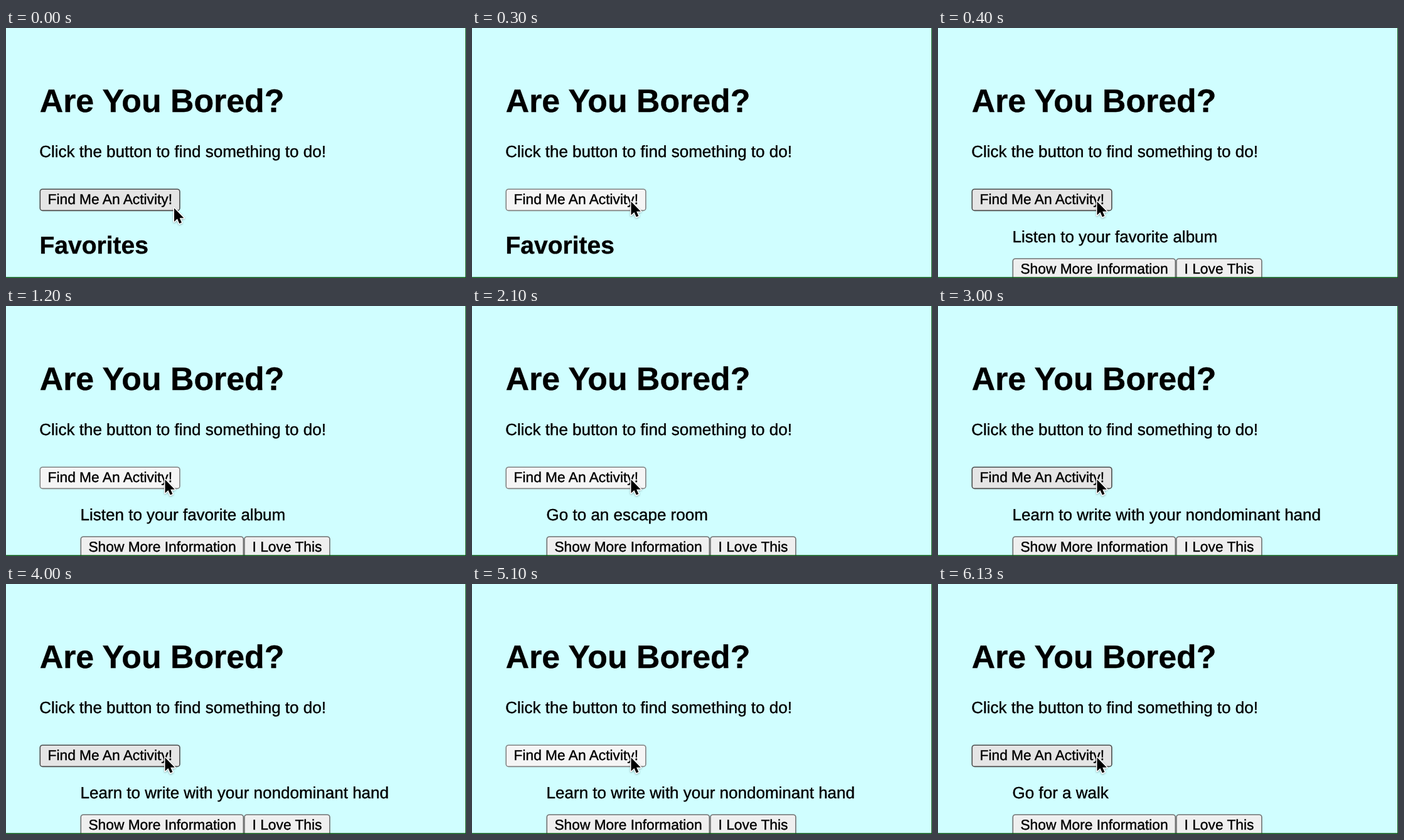
An HTML page that plays this animation: 733x399 px, repeating every 6.27 s.

```html
<!DOCTYPE html>
<html lang="en">
<head>
<meta charset="utf-8">
<title>Are You Bored?</title>
<style>
  html, body { margin: 0; width: 100%; height: 100%; overflow: hidden; background: #d0feff; }
  svg { display: block; width: 733px; height: 399px; }
  text {
    font: 26px "Liberation Sans", Arial, sans-serif;
    text-rendering: geometricPrecision;
    stroke: #000;
    stroke-width: .4px;
  }
  text.h1 { font-size: 51.8px; font-weight: bold; }
  text.h2 { font-size: 39px; font-weight: bold; }
  text.label { font-size: 22.75px; text-anchor: middle; }
  rect.button { fill: #efefef; stroke: #707070; stroke-width: 1.6px; }
  rect.hover { fill: #e5e5e5; stroke: #4a4a4a; }
  rect.active { fill: #f5f5f5; stroke: #808080; }
  #cursor { filter: drop-shadow(0 1.5px 1.5px rgba(0, 0, 0, .3)); }
</style>
</head>
<body>
<svg viewBox="0 0 733 399">
  <text class="h1" x="53.8" y="134.2">Are You Bored?</text>
  <text x="53.2" y="205.5">Click the button to find something to do!</text>

  <rect id="find" class="button" x="54.3" y="257.2" width="222.6" height="34.2" rx="4"/>
  <text class="label" x="165.8" y="281.4">Find Me An Activity!</text>

  <text id="favorites" class="h2" x="53.5" y="359.5">Favorites</text>

  <g id="result">
    <text id="activity" x="118.6" y="342"></text>
    <rect class="button" x="119.3" y="368.2" width="259" height="34.2" rx="4"/>
    <text class="label" x="249" y="392.4">Show More Information</text>
    <rect class="button" x="379.9" y="368.2" width="136" height="34.2" rx="4"/>
    <text class="label" x="448" y="392.4">I Love This</text>
  </g>

  <path d="M732 0H733V399H0V397.5H732Z" fill="#0b5a14"/>
  <path id="cursor" d="M0 0V21.5L5 17L8.3 24.6L11.9 23L8.7 15.8H15.3Z"
        stroke="#fff" stroke-width="3" stroke-linejoin="round" paint-order="stroke"/>
</svg>
<script>
  const LOOP = 6270, MOVE = [0, .4, .8, 1];
  const $ = id => document.getElementById(id);

  // Each click: time pressed, time released, activity shown on release
  const clicks = [
    [300, 400, "Listen to your favorite album"],
    [1200, 1400, "Go to an escape room"],
    [2100, 2300, "Learn how to whistle with your fingers"],
    [2700, 2800, "Learn to write with your nondominant hand"],
    [5100, 5200, "Go for a walk"]
  ];

  function draw(now) {
    const t = now % LOOP;
    const pressed = clicks.some(([down, up]) => t >= down && t < up);
    const done = clicks.filter(([, up]) => t >= up).pop();
    const k = MOVE[Math.min(3, Math.floor(t / 100))];

    $("find").setAttribute("class", "button " + (pressed ? "active" : "hover"));
    $("favorites").style.display = done ? "none" : "";
    $("result").style.display = done ? "" : "none";
    $("activity").textContent = done ? done[2] : "";
    $("cursor").setAttribute("transform", `translate(${268 - 14.5 * k} ${287.5 - 10.5 * k})`);
  }

  let start;
  function tick(now) {
    start ??= now;
    draw(now - start);
    requestAnimationFrame(tick);
  }
  draw(0);
  requestAnimationFrame(tick);
</script>
</body>
</html>
```
